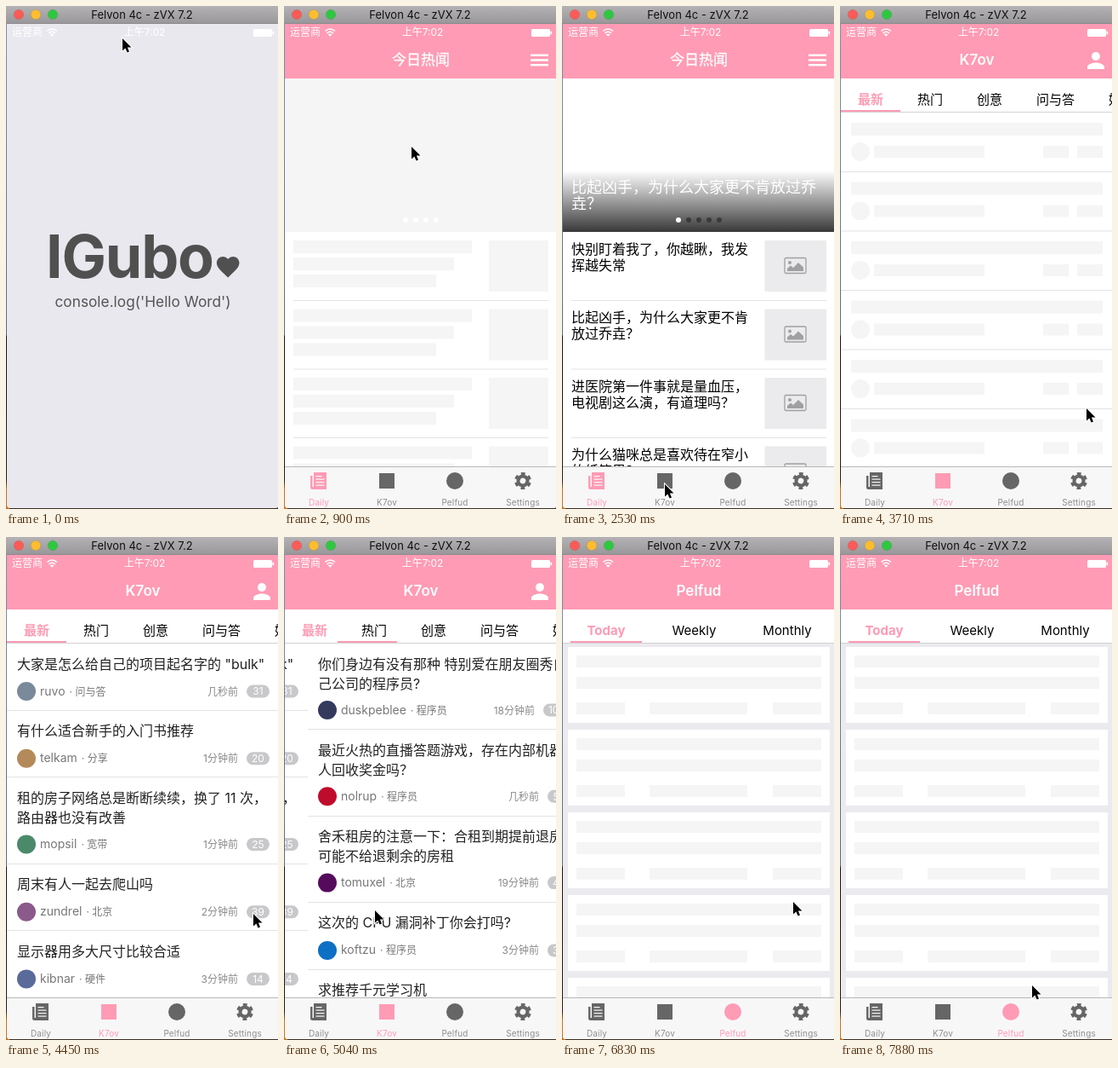
An HTML page for the animation above (8 s loop, 320 by 590 pixels).

```html
<!DOCTYPE html>
<html lang="zh-CN">
<head>
<meta charset="utf-8">
<title>App demo</title>
<style>
html, body { margin: 0; width: 100%; height: 100%; overflow: hidden; background: #777 }
svg { display: block; width: 320px; height: 590px; font-family: Inter, "Noto Sans CJK SC", "Noto Sans CJK", sans-serif }
:root { --pink: #ff9bb4; --tick: 8s step-end infinite }

/* One tick is 1/54 of the loop; every change lands on a tick. */
#daily { animation: daily var(--tick) }
#feed { animation: feed var(--tick) }
#list { animation: pull var(--tick) }
#forum { animation: forum var(--tick) }
#topics { animation: topics var(--tick) }
#pages { animation: swipe var(--tick) }
#marker { animation: marker var(--tick) }
#tab0 { fill: var(--pink); font-weight: 600; animation: unpick var(--tick) }
#tab1 { animation: pick var(--tick) }
#repos { animation: repos var(--tick) }
#cursor { animation: cursor 8s infinite }

@keyframes daily { from { opacity: 0 } 3.704% { opacity: .35 } 5.556% { opacity: .75 } 7.407%, to { opacity: 1 } }
@keyframes feed { from { opacity: 0 } 18.519%, to { opacity: 1 } }
@keyframes forum { from { opacity: 0 } 35.185%, to { opacity: 1 } }
@keyframes topics { from { opacity: 0 } 55.556%, to { opacity: 1 } }
@keyframes repos { from { opacity: 0 } 74.074%, to { opacity: 1 } }
@keyframes pull {
  from { transform: translateY(0) }
  20.37% { transform: translateY(18px) }
  22.222% { transform: translateY(34px) }
  24.074% { transform: translateY(23px) }
  25.926% { transform: translateY(10px) }
  27.778% { transform: translateY(3px) }
  29.63%, to { transform: translateY(0) }
}
@keyframes swipe {
  from { transform: translateX(0) }
  57.407% { transform: translateX(-12px) }
  59.259% { transform: translateX(-70px) }
  61.111% { transform: translateX(-180px) }
  62.963% { transform: translateX(-293px) }
  64.815% { transform: translateX(-314px) }
  66.667%, to { transform: translateX(-320px) }
}
@keyframes marker {
  from { transform: translateX(0) }
  57.407% { transform: translateX(2px) }
  59.259% { transform: translateX(14px) }
  61.111% { transform: translateX(38px) }
  62.963% { transform: translateX(62px) }
  64.815% { transform: translateX(68px) }
  66.667%, to { transform: translateX(70px) }
}
@keyframes pick { 66.667%, to { fill: var(--pink); font-weight: 600 } }
@keyframes unpick { 66.667%, to { fill: #000; font-weight: 400 } }
@keyframes cursor {
  from { transform: translate(137px, 38px); animation-timing-function: steps(6) }
  11.111% { transform: translate(150px, 165px); animation-timing-function: steps(1) }
  12.963% { transform: translate(149px, 176px); animation-timing-function: step-end }
  14.815% { transform: translate(149px, 176px); animation-timing-function: steps(5) }
  24.074% { transform: translate(119px, 512px); animation-timing-function: steps(3) }
  29.63% { transform: translate(119px, 564px); animation-timing-function: step-end }
  31.481%, 38.889% { transform: translate(121px, 561px); animation-timing-function: steps(4) }
  46.296% { transform: translate(290px, 472px); animation-timing-function: steps(4) }
  53.704%, 55.556% { transform: translate(291px, 442px); animation-timing-function: steps(4) }
  62.963% { transform: translate(107px, 438px); animation-timing-function: steps(3) }
  68.519% { transform: translate(160px, 571px); animation-timing-function: step-end }
  70.37%, 74.074% { transform: translate(194px, 570px); animation-timing-function: steps(6) }
  85.185%, 87.037% { transform: translate(272px, 428px); animation-timing-function: steps(6) }
  98.148%, to { transform: translate(226px, 526px) }
}
</style>
</head>
<body>
<svg id="stage" viewBox="0 0 320 590"></svg>
<script>
const PINK = 'var(--pink)', GREY = '#666', PALE = '#f5f5f5', LINE = '#e3e3e5', BACK = '#e9e8ee';

const rect = (x, y, w, h, fill, more = '') =>
  `<rect x="${x}" y="${y}" width="${w}" height="${h}" fill="${fill}" ${more}/>`;
const dot = (x, y, r, fill, more = '') => `<circle cx="${x}" cy="${y}" r="${r}" fill="${fill}" ${more}/>`;
const text = (x, y, size, fill, str, more = '') =>
  `<text x="${x}" y="${y}" font-size="${size}" fill="${fill}" ${more}>${str}</text>`;
const mid = (x, y, size, fill, str, more = '') =>
  text(x, y, size, fill, str, 'text-anchor="middle" ' + more);
const path = (d, fill, more = '') => `<path d="${d}" fill="${fill}" ${more}/>`;
const group = (id, body) => `<g id="${id}">${body}</g>`;
const times = (n, fn) => Array.from({ length: n }, (_, i) => fn(i)).join('');

// Shared chrome

const newsIcon = c =>
  path('M35 547h15v20H33.5q-2.5 0-2.5-2.5V551h2.5v13h1.5z', c) +
  [551, 554.5, 558, 561.5].map((y, i) => rect(37.5, y, i ? 10 : 7, 1.2, '#f8f8f8')).join('');

const gearIcon = c =>
  `<g fill="none" stroke="${c}" transform="rotate(14 281 557)">
    <circle cx="281" cy="557" r="5.5" stroke-width="4.2"/>
    <circle cx="281" cy="557" r="8.2" stroke-width="3.6" stroke-dasharray="4.6 3.987"/></g>`;

const icons = [newsIcon, c => rect(112, 548, 18, 18, c), c => dot(201, 557, 10, c), gearIcon];

function tabBar(active) {
  const names = ['Daily', 'K7ov', 'Pelfud', 'Settings'];
  return rect(1, 540, 320, 50, '#f7f7f8') + rect(1, 540, 320, 1, '#b9b9bb') +
    names.map((name, i) => {
      const on = i === active;
      return icons[i](on ? PINK : GREY) +
        mid(41 + 80 * i, 585.5, 10, on ? PINK : '#8e8e8e', name, 'letter-spacing=".15"');
    }).join('');
}

const header = (title, more) =>
  rect(1, 21, 320, 64, PINK) + mid(161, 69, 17, '#fff', title, more);

const topTabs = body => rect(1, 85, 320, 39, '#fff') + rect(1, 124, 320, 1, '#d2d2d4') + body;

// Splash

const heart = path('M12 21.35l-1.45-1.32C5.4 15.36 2 12.28 2 8.5 2 5.42 4.42 3 7.5 3' +
  'c1.74 0 3.41.81 4.5 2.09C13.09 3.81 14.76 3 16.5 3 19.58 3 22 5.42 22 8.5' +
  'c0 3.78-3.4 6.86-8.55 11.54z', '#505050', 'transform="translate(245.2 290) scale(1.33)"');

const splash = rect(1, 21, 320, 569, BACK) +
  text(47, 318.5, 70, '#505050', 'IGubo', 'font-weight="700" letter-spacing="-1.2"') + heart +
  mid(161, 353, 17.3, '#555', "console.log('Hello Word')");

// Daily news

const ROW = 80.5;
const dailyBones = rect(1, 85, 320, 456, '#fff') + rect(1, 85, 320, 180, PALE) +
  times(4, i => dot(143 + 12 * i, 251, 3, '#fff')) +
  times(4, i => {
    const y = 265 + ROW * i;
    return times(3, j => rect(11, y + 10 + 20 * j, 210 - 21 * j, 15, PALE)) +
      rect(241, y + 10, 70, 60, PALE) + rect(11, y + 80, 300, 1, LINE);
  });

const photoIcon = y =>
  `<g transform="translate(262 ${y})"><rect width="25" height="18" rx="1.5" fill="none" stroke="#a0a0a2" stroke-width="1.3"/>
    ${dot(6, 5.5, 2, '#a0a0a2')}${path('M3 15.5v-3l4-3.5 3 2.5 6-6 6 5.5v4.5z', '#a0a0a2')}</g>`;

const stories = [
  ['快别盯着我了，你越瞅，我发', '挥越失常'],
  ['比起凶手，为什么大家更不肯', '放过乔垚？'],
  ['进医院第一件事就是量血压，', '电视剧这么演，有道理吗？'],
  ['为什么猫咪总是喜欢待在窄小', '的纸箱里？']
];

const feed = rect(1, 85, 320, 456, '#ebebee') + group('list',
  rect(1, 85, 320, 520, '#fff') +
  rect(1, 193, 320, 72, 'url(#shade)') +
  text(11, 218.5, 18, '#fff', '比起凶手，为什么大家更不肯放过乔') +
  text(11, 237.5, 18, '#fff', '垚？') +
  times(5, i => dot(137 + 12 * i, 251, 3, i ? '#3a3a3a' : '#fff')) +
  stories.map((lines, i) => {
    const y = 265 + ROW * i;
    return lines.map((s, j) => text(11, y + 25.5 + 19 * j, 16, '#000', s)).join('') +
      rect(238.5, y + 10, 72.5, 60, '#ebebed') + photoIcon(y + 30.5) +
      rect(11, y + 80, 300, 1, LINE);
  }).join(''));

const daily = dailyBones + group('feed', feed) +
  header('今日热闻', 'stroke="#fff" stroke-width=".3"') +
  times(3, i => rect(290, 56.5 + 5.75 * i, 21, 2.4, '#fff')) + tabBar(0);

// Forum

const forumBones = rect(1, 125, 320, 416, '#fff') + times(6, i => {
  const y = 125 + 69.5 * i;
  return rect(13, y + 12, 296, 15, PALE) + dot(24, y + 46, 11, PALE) +
    rect(40, y + 39, 130, 14, PALE) + rect(239, y + 39, 30, 14, PALE) +
    rect(279, y + 39, 30, 14, PALE) + rect(1, y + 69, 320, 1, LINE);
});

// Each topic: title lines, author, node, age, replies, avatar colour
const latest = [
  [['大家是怎么给自己的项目起名字的 "bulk"'], 'ruvo', '问与答', '几秒前', 31, '#7a8a9a'],
  [['有什么适合新手的入门书推荐'], 'telkam', '分享', '1分钟前', 20, '#b58a5a'],
  [['租的房子网络总是断断续续，换了 11 次，', '路由器也没有改善'], 'mopsil', '宽带', '1分钟前', 25, '#4a8a6a'],
  [['周末有人一起去爬山吗'], 'zundrel', '北京', '2分钟前', 39, '#8a5a8a'],
  [['显示器用多大尺寸比较合适'], 'kibnar', '硬件', '3分钟前', 14, '#5a6a9a']
];
const hot = [
  [['你们身边有没有那种 特别爱在朋友圈秀自', '己公司的程序员?'], 'duskpeblee', '程序员', '18分钟前', 104, '#343a5e'],
  [['最近火热的直播答题游戏，存在内部机器', '人回收奖金吗？'], 'nolrup', '程序员', '几秒前', 57, '#c00c2c'],
  [['舍禾租房的注意一下：合租到期提前退房', '可能不给退剩余的房租'], 'tomuxel', '北京', '19分钟前', 42, '#560a5c'],
  [['这次的 CPU 漏洞补丁你会打吗?'], 'koftzu', '程序员', '3分钟前', 36, '#0d70c4'],
  [['求推荐千元学习机'], 'febwin', '问与答', '5分钟前', 28, '#7a7a5a']
];

function topicPage(topics, x) {
  let y = 125;
  return topics.map(([lines, author, node, age, count, color]) => {
    const tall = lines.length > 1, meta = y + (tall ? 78 : 56), w = count > 99 ? 32 : 27;
    const row = lines.map((s, j) => text(x + 12, y + 29.5 + 23 * j, 16, '#222', s)).join('') +
      dot(x + 23, meta, 11, color) +
      text(x + 39, meta + 4.5, 14, '#777', `${author}<tspan dx="5" font-size="12">· ${node}</tspan>`) +
      text(x + 299 - w, meta + 4.5, 12, '#888', age, 'text-anchor="end"') +
      rect(x + 309 - w, meta - 7.5, w, 15, '#c8c8cb', 'rx="7.5"') +
      mid(x + 309 - w / 2, meta + 4.3, 12, '#fff', count);
    y += tall ? 101.3 : 78.7;
    return row + rect(x, Math.round(y) - 1, 320, 1, LINE);
  }).join('');
}

const topics = rect(1, 125, 320, 416, '#fff') +
  group('pages', topicPage(latest, 1) + topicPage(hot, 321));

const forumTabs = ['最新', '热门', '创意', '问与答', '好玩'].map((s, i) =>
  text(21 + 70 * i + (i > 3 ? 15 : 0), 115, 15, '#000', s, `id="tab${i}"`)).join('') +
  rect(1, 122, 70, 2, PINK, 'id="marker"');

const person = dot(301, 59, 5, '#fff') +
  path('M291 74v-2.5c0-3.5 6.5-5 10-5s10 1.5 10 5v2.5z', '#fff');

const forum = forumBones + group('topics', topics) + topTabs(forumTabs) +
  header('K7ov', 'font-weight="600"') + person + tabBar(1);

// Repositories

const repoBones = rect(1, 125, 320, 416, '#ebebef') + times(5, i => {
  const y = 129 + 97 * i;
  return rect(7, y, 308, 89, '#fff') + rect(17, y + 10, 288, 14, PALE) + rect(17, y + 35, 288, 14, PALE) +
    rect(17, y + 65, 57, 14, PALE) + rect(103, y + 65, 115, 14, PALE) + rect(248, y + 65, 57, 14, PALE);
});

const repoTabs = mid(52, 115, 15, PINK, 'Today', 'font-weight="700"') +
  mid(155.5, 115, 15, '#000', 'Weekly') + mid(265, 115, 15, '#000', 'Monthly') +
  rect(10, 122, 84, 2, PINK);

const repos = repoBones + topTabs(repoTabs) + header('Pelfud', 'font-weight="600"') + tabBar(2);

// Window frame

const titleBar = rect(0, 0, 320, 21, 'url(#bar)') + rect(0, 20, 320, 1, '#8d8b8d') +
  ['#fc5b57', '#fdbd2f', '#2ec840'].map((c, i) =>
    dot(15 + 20 * i, 10, 5.75, c, 'stroke="#000" stroke-opacity=".15" stroke-width=".5"')).join('') +
  mid(160, 15, 13, '#111', 'Felvon 4c - zVX 7.2');

const statusBar = text(7, 35.3, 12, '#fff', '运营商') +
  path('M48.5 29.5a8 8 0 0 1 11.5 0M50.5 32a5 5 0 0 1 7.5 0', 'none', 'stroke="#fff" stroke-width="1.5"') +
  path('M51.8 33.3q2.4-1.6 4.8 0l-2.4 2.5z', '#fff') +
  mid(163, 35.3, 12, '#fff', '上午7:02') +
  rect(291, 27, 22, 9, '#fff', 'rx="1.5"') + rect(313.5, 29.5, 1.7, 4, '#fff', 'rx=".8"');

const cursor = path('M0 0V14.5L3.4 11.4 5.6 16.5 8 15.5 5.9 10.5H10.5Z', '#000',
  'stroke="#fff" stroke-width="2" paint-order="stroke"');

const defs = `<defs>
  <linearGradient id="bar" x2="0" y2="1"><stop stop-color="#b4b2b4"/><stop offset="1" stop-color="#989698"/></linearGradient>
  <linearGradient id="shade" x2="0" y2="1"><stop stop-color="#000" stop-opacity="0"/><stop offset="1" stop-color="#000" stop-opacity=".78"/></linearGradient>
  <linearGradient id="desk" x2="0" y2="1"><stop stop-color="#8090b0"/><stop offset=".64" stop-color="#5c6a88"/>
    <stop offset=".645" stop-color="#161616"/><stop offset=".94" stop-color="#2a1c14"/><stop offset=".96" stop-color="#c8741c"/></linearGradient>
  <clipPath id="screen"><rect x="1" y="0" width="320" height="589" rx="4"/></clipPath>
</defs>`;

document.getElementById('stage').innerHTML = defs +
  rect(0, 0, 320, 590, '#3a2c24') + rect(0, 21, 4, 569, 'url(#desk)') +
  `<g clip-path="url(#screen)">${splash}${group('daily', daily)}${group('forum', forum)}${group('repos', repos)}</g>` +
  titleBar + statusBar + group('cursor', cursor);
</script>
</body>
</html>
```
